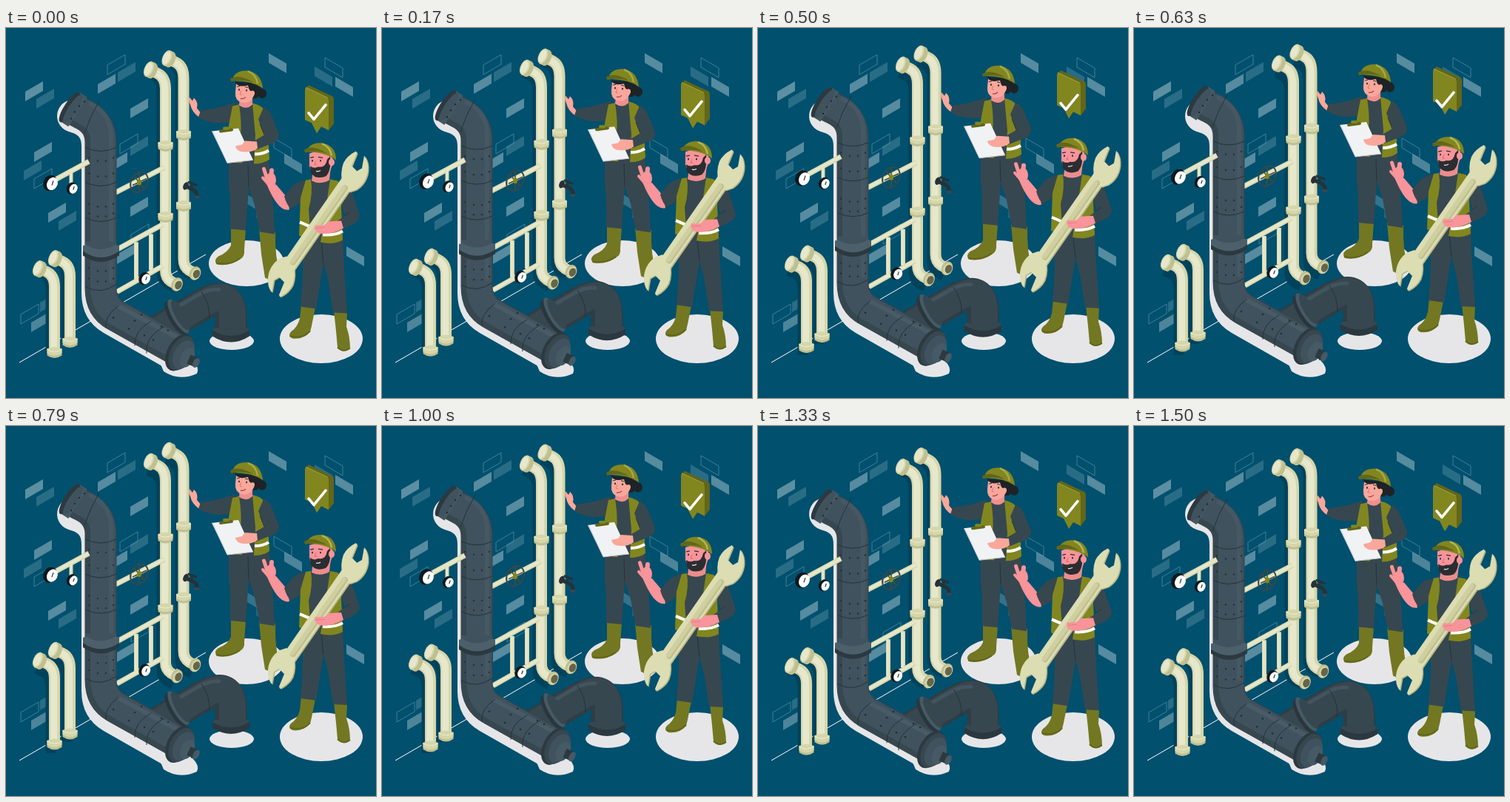
Animation of 500 by 500 pixels, one loop 1540 ms. Source, as an HTML page:

```html
<!DOCTYPE html>
<html lang="en">
<head>
<meta charset="utf-8">
<title>Pipe repair crew</title>
<style>
  html, body { margin: 0; width: 100%; height: 100%; overflow: hidden; background: #00506e; }
  svg { display: block; width: 100vw; height: 100vh; }
</style>
</head>
<body>
<svg id="stage" viewBox="0 0 500 500"></svg>
<script>
// The float cycle is slightly shorter than the loop and is already under way at its start.
const LOOP = 1540, PERIOD = 1500, LEAD = 41;
const cream = '#e6e7cb', creamMid = '#d5d6aa', creamDark = '#bfbf90';
const olive = '#82861f', oliveDark = '#62661a', boot = '#737722';
const slate = '#37474f', steel = '#40525e', ink = '#263238', floor = '#e6e6e8';
const peach = '#f9a79b', pink = '#f8949a';

const fill = (d, color, extra = '') => `<path d="${d}" fill="${color}" ${extra}/>`;
const line = (d, color, w = 1, extra = '') =>
  `<path d="${d}" fill="none" stroke="${color}" stroke-width="${w}" ${extra}/>`;
const round = 'stroke-linecap="round" stroke-linejoin="round"';
const oval = (x, y, rx, ry, color, turn = 0) =>
  `<ellipse cx="${x}" cy="${y}" rx="${rx}" ry="${ry}" fill="${color}" transform="rotate(${turn} ${x} ${y})"/>`;
const group = (content, id = '', move = '') => `<g id="${id}" transform="${move}">${content}</g>`;

// A wall brick: side 1 rises to the right, side -1 falls to the right; alpha 0 is an outline.
function brick(x, y, side, alpha) {
  const d = `M${x},${y}l24,${-14 * side}v13l-24,${14 * side}z`;
  return alpha ? fill(d, '#fff', `opacity="${alpha}"`) : line(d, '#4f8ba2', .8);
}
const bricks = () => [
  [26, 86, 1, .36], [41, 96, 1, .16], [38, 168, 1, .34], [24, 193, 1, .16], [38, 204, 1, 0],
  [137, 50, 1, 0], [124, 76, 1, .34], [151, 60, 1, .16], [168, 109, 1, .34], [168, 160, 1, .16],
  [154, 157, 1, 0], [140, 182, 1, .34], [168, 242, 1, .34], [57, 250, 1, .34], [71, 261, 1, .16],
  [169, 279, 1, 0], [150, 306, 1, .34], [20, 387, 1, 0], [46, 371, 1, .16], [34, 398, 1, .3],
  [355, 34, -1, .34], [431, 40, -1, 0], [417, 52, -1, .16], [445, 66, -1, .34], [362, 149, -1, 0],
  [376, 170, -1, .3], [460, 295, -1, .34], [326, 225, -1, .2], [338, 243, -1, .13]
].map(b => brick(...b)).join('');

const tube = (d, w = 15) => line(d, creamMid, w) +
  group(line(d, cream, w * .6), '', `translate(${-w * .06} 0)`);
const collar = (x, y) =>
  fill(`M${x - 10},${y - 5}v9q10,7 20,0v-9z`, creamDark) +
  fill(`M${x - 10},${y - 5}v6q10,7 20,0v-6q-10,-5 -20,0z`, creamMid) +
  line(`M${x - 10},${y - 4}q10,6 20,0`, '#eeeed6', 1);
const mouth = (x, y) => oval(x + 5, y + 2.5, 6, 11, creamDark, 24) +
  line(`M${x},${y}l5,2.500`, creamDark, 22) + oval(x, y, 6, 11, creamMid, 24) + oval(x - .5, y, 4.5, 9, cream, 24);

const tallPath = 'M197,58L205,62Q215.500,67 215.500,83V328Q215.500,338 223,343L231,347';
const shortPath = 'M46,326L55,330Q65.500,335 65.500,350V440';
const tall = () => tube(tallPath) + mouth(193, 56) + collar(215.5, 160) + collar(215.5, 256) +
  oval(231, 347, 7.5, 9.5, creamDark, 24) + oval(232, 348, 6, 8, creamMid, 24) + oval(233, 348, 4.5, 6, '#66654a', 24);
const short = () => tube(shortPath) + mouth(43, 325) + collar(65.5, 439);

function gauge(x, y, s) {
  return oval(x - 1.5 * s, y, 9 * s, 11 * s, '#10191d', 28) + oval(x + 1.5 * s, y + s, 7 * s, 9 * s, '#fff', 28) +
    line(`M${x + s},${y + 3 * s}l${2 * s},${-6 * s}`, ink, 1.2);
}
const fittings = () =>
  tube('M148,223L214,189', 7) + tube('M150,300L212,266', 7) + tube('M150,357L212,322', 7) +
  tube('M176,290V340', 6) + tube('M196,279V328', 6) + gauge(188, 339, .8) +
  line('M171,213L190,204M180,196V222M173,201L187,217', '#4b4b38', 1.6) +
  `<ellipse cx="180" cy="209" rx="11" ry="14.500" fill="none" stroke="#37474f" stroke-width="2" transform="rotate(28 180 209)"/>` +
  oval(180, 209, 3, 4, olive);
const faucet = () => oval(243, 214, 3.5, 5.5, ink, 24) +
  line('M244,215L253,219Q259,222 258,229', ink, 5) + line('M250,218L252,211', ink, 2.5) +
  line('M247,209L257,213', ink, 3, round) + oval(258, 229, 3.5, 2.2, slate);

const mainPath = 'M87,108L100,115Q128,127 128,155V352Q128,378 148,389L232,436';
const branchPath = 'M203,411L268,373Q304,353 304,393V414';

function rivets() {
  let dots = '';
  for (const y of [176, 197, 238, 251, 325, 339])
    for (const [dx, dy] of [[0, 0], [12, 4], [23, 4], [33, 0]]) dots += oval(112 + dx, y + dy, 1.2, 1.2, ink);
  for (const [x, y] of [[145, 392], [183, 388], [174, 396], [166, 407], [187, 416], [210, 404], [219, 409], [199, 422],
    [106, 100], [99, 106], [93, 114], [88, 123]])
    dots += oval(x, y, 1.2, 1.2, '#202b31');
  return dots;
}

const bigPipe = () =>
  line(branchPath, '#2f3d45', 43) +
  group(line(branchPath, slate, 36), '', 'translate(2 -2)') +
  line('M224,382L262,360Q275,353 288,354', '#4a5e6a', 5, round + ' opacity=".6"') +
  oval(229, 393, 8, 26, '#2a363d', -30) + oval(233, 390, 8, 26, '#455a64', -30) + oval(236, 389, 7, 23, slate, -30) +
  line('M264,357Q276,374 275,393', ink, 1) +
  fill('M279,409v8q25,16 50,0v-8z', '#2b383f') + fill('M279,409q25,15 50,0l-2,-3h-46z', slate) +
  line(mainPath, slate, 43) +
  group(line(mainPath, steel, 34), '', 'translate(3 -2)') +
  line('M114,103Q141,115 142,146V342', '#4a5e6a', 6, round + ' opacity=".5"') +
  line('M153,377L230,418', '#4f626d', 6, round + ' opacity=".6"') +
  line('M86,107L97,114', '#455862', 47) +
  oval(86, 107.5, 7, 24, '#2c3940', 33) + oval(90, 110, 6, 22.5, steel, 33) +
  line('M107,162Q128,172 149,162M107,209Q128,219 149,209M107,257Q128,267 149,257M107,350Q128,362 149,347' +
       'M106,143Q113,121 126,99M135,406Q132,390 153,375M174,430Q173,409 196,397M190,440Q188,418 214,404', ink, 1) +
  fill('M104,295v13q24,17 49,0v-13z', '#2c3940') + fill('M104,295v7q24,17 49,0v-7q-24,-10 -49,0z', '#4c606c') +
  fill('M107,293q21,13 42,0v-4h-42z', steel) + rivets() +
  oval(234, 439, 16, 27, '#2c3940', 28) + oval(237, 440, 15, 25, slate, 28) + oval(240, 442, 13, 21, steel, 28) +
  oval(245, 446, 9, 14, '#455a64', 28) + line('M247,448L256,452', '#2c3940', 13) + oval(257, 453, 4, 7, '#455a64', 28);

const floorShadows = () =>
  line('M91,119L100,122Q124,132 124,160V358Q124,382 143,393L229,442', floor, 44, 'stroke-linejoin="round" stroke-linecap="round"') +
  fill('M204,443L213,464Q234,478 258,467Q262,459 252,449z', floor) +
  oval(305, 423, 30, 12, floor) + oval(325, 318, 51, 31, floor) + oval(426, 420, 56, 33, floor);

const woman = () =>
  // legs and boots
  fill('M342,272L345,306L350,338Q360,344 371,336Q363,310 364,276z', boot) +
  fill('M304,270L304,294Q300,304 287,309Q280,314 285,320Q302,323 316,313Q323,310 322,300L324,272z', boot) +
  line('M284,318Q302,322 316,312', oliveDark, 2) +
  fill('M301,176L355,178Q359,215 361,240L363,279L343,276L336,240L328,216L324,274L303,272Q304,235 301,215z', slate) +
  line('M328,216L327,186', ink) +
  // reaching arm
  fill('M264,116L258,109Q260,100 254,95L252,99L248,94Q246,98 249,104Q251,114 261,121z', peach) +
  fill('M309,101Q295,106 283,109L263,112L260,121Q280,133 306,127z', slate) +
  // torso and vest
  fill('M304,107Q315,101 335,104L354,112L355,178Q327,187 300,179L302,140z', slate) +
  fill('M306,106L315,104Q319,130 317,145L319,183Q306,183 299,178L301,132z', olive) +
  fill('M333,102Q344,104 350,112Q354,140 356,178Q348,184 335,184L337,146z', olive) +
  line('M336,171Q347,171 355,166', '#fff', 4) +
  // head
  fill('M316,93L315,105Q325,112 333,104L333,90z', '#ee8f90') +
  oval(346, 89, 6, 6.5, '#1d2326') + fill('M309,73L345,76Q347,90 338,96L326,94z', '#1d2326') +
  fill('M311,76Q316,81 327,78Q329,88 333,85Q338,86 335,92Q329,104 318,101Q309,98 310,87z', peach) +
  fill('M306,71Q308,58 326,58Q345,61 347,82Q330,71 306,72z', olive) +
  fill('M303,69Q315,62 334,74Q317,69 304,73z', oliveDark) +
  line('M327,59Q338,63 340,76', '#a5a84a', 2.5) +
  oval(315, 84, 1, 1.4, ink) + oval(325, 85, 1, 1.4, ink) + line('M318,85L316,90L319,91', '#d9747a', 1) +
  line('M317,96Q321,97 324,94', '#9d3d45', 1.2) + line('M312,80l4,-1M323,80l4,1', ink, 1) +
  // clipboard and holding arm
  fill('M278,140L314,136L334,179L299,183z', '#f1f2f4') + line('M279,140L299,183L334,179', '#c9ccd1', 1) +
  line('M290,140L305,138', oliveDark, 4, round) + line('M295,136h5', olive, 4, round) +
  fill('M348,108Q356,110 360,122L369,143Q370,150 363,155L338,165L334,154L349,145L341,124z', slate) +
  line('M349,145L343,130', ink) +
  fill('M339,154L323,153L319,158L310,160Q311,167 321,168Q333,169 340,163z', peach);

const man = () =>
  fill('M399,374L397,393Q394,405 385,411Q380,417 387,420Q402,422 411,411L413,403L418,378z', boot) +
  fill('M443,382L446,410L448,432Q455,441 465,434Q465,418 460,404L461,386z', boot) +
  line('M384,417Q401,421 411,410M448,432Q456,440 465,433', oliveDark, 2) +
  fill('M400,280L455,282L457,325L461,386L442,385L435,340L429,318L419,380L398,377Q403,328 400,280z', slate) +
  line('M429,318L426,289', ink) +
  // raised arm
  line('M348.500,191L353,205', pink, 5, round) + line('M347,203L354,211', pink, 4, round) +
  line('M359,193L358,204', pink, 6, round) + oval(358, 206, 7, 10, pink) +
  fill('M352,211L365,212L381,231L383,246Q368,250 352,211z', pink) +
  fill('M404,206Q395,208 388,213L376,228Q379,239 385,245L402,234z', slate) +
  // torso
  fill('M399,209Q420,201 451,210L456,289Q426,297 398,281z', slate) +
  fill('M405,206L412,205Q415,224 409,245L412,288L396,281L398,230z', olive) +
  fill('M438,205L448,207Q459,215 453,242L455,287Q443,294 425,290L431,253z', olive) +
  line('M397,263L411,269M428,280Q445,281 455,275', '#fff', 4) +
  fill('M451,209Q463,212 468,224L478,253Q478,262 466,267L450,274L444,264L458,254L452,236z', slate) +
  line('M458,254L464,249', ink) +
  // head
  fill('M415,193L413,207Q425,213 437,206L439,188z', '#ec8d8d') +
  fill('M410,170Q430,163 441,176Q442,196 429,201Q414,201 410,187z', pink) +
  fill('M411,187Q416,191 422,188Q432,190 434,178L438,174Q440,194 432,201Q418,206 412,196z', '#2b2d31') +
  line('M419,194Q422,195 425,193', '#e9dede', 1.3) + oval(440, 182, 4, 5, pink) +
  oval(414, 180, 1, 1.4, ink) + oval(425, 180, 1, 1.4, ink) + line('M411,176l5,-1M422,175l6,1', ink, 1.3) +
  line('M419,180L417,185H420', '#d36c72', 1) +
  fill('M406,167Q411,155 427,156Q446,159 446,179Q431,168 406,168z', olive) +
  fill('M403,165Q414,157 434,170Q418,165 404,169z', oliveDark) +
  line('M427,157Q438,161 440,173', '#b3b55a', 2.5);

// Both wrench jaws share one outline, turned half way round the middle of the shaft.
const jaw = 'M455,213Q451,196 456,183Q461,173 473,167L474,170L467,187L474,194L481,190L484,173' +
  'Q490,181 489,193Q487,210 473,219L464,222z';
const wrenchBody = color => fill(jaw, color) + group(fill(jaw, color), '', 'rotate(180 421.5 265.5)') +
  line('M465,203L378,328', color, 18);
const wrench = () =>
  group(wrenchBody('#b5b587'), '', 'translate(1.5 1)') + wrenchBody('#dcddb3') +
  line('M458,217L388,317', '#c0c090', 8, round) + line('M456.500,216.500L387,316', '#cfcfa0', 6, round) +
  fill('M453,261L436,262L430,267L418,267Q415,272 421,277Q436,282 456,271z', pink) +
  line('M419,271L431,270', '#e17f84', 1);

const badge = () =>
  fill('M404,84L409,79L441,94Q443,95 443,99V131L436,140z', oliveDark) +
  fill('M404,86Q404,81 408,83L433,95Q436,97 436,100V140L426,135L420,144L413,130L404,126z', olive) +
  line('M405,82L435,96', '#a0a33f', 1);

const wallShadow = (d, x, y) => line(d, '#00425c', 14, `transform="translate(${x} ${y})"`);

document.getElementById('stage').innerHTML =
  bricks() + line('M18,452L270,306', '#fff', 1) +
  wallShadow(tallPath, -5, 2) + wallShadow(tallPath, 20, -13) +
  wallShadow(shortPath, -5, 2) + wallShadow(shortPath, 16, -13) +
  floorShadows() +
  group(
    group(tall(), '', 'translate(24.5 -15)') + tall() + faucet() +
    group(short(), '', 'translate(21 -14)') + short() + fittings() + bigPipe() +
    tube('M64,207L112,181', 7) + tube('M88,195V212', 5) + gauge(61, 210, 1) + gauge(90, 217, .75) +
    woman() + man() + wrench(), 'crew') +
  group(badge(), 'badge') +
  group(line('M409,116L416,124.500L432,105', '#fff', 3.6, round), 'tick');

const rise = { crew: 10, badge: 30, tick: 20 };
const parts = Object.keys(rise).map(id => [document.getElementById(id), rise[id]]);

function draw() {
  const phase = (performance.now() % LOOP + LEAD) % PERIOD / PERIOD;
  const lift = 1 - Math.abs(1 - 2 * phase);
  for (const [part, height] of parts) part.setAttribute('transform', `translate(0 ${-height * lift})`);
  requestAnimationFrame(draw);
}
draw();
</script>
</body>
</html>
```
